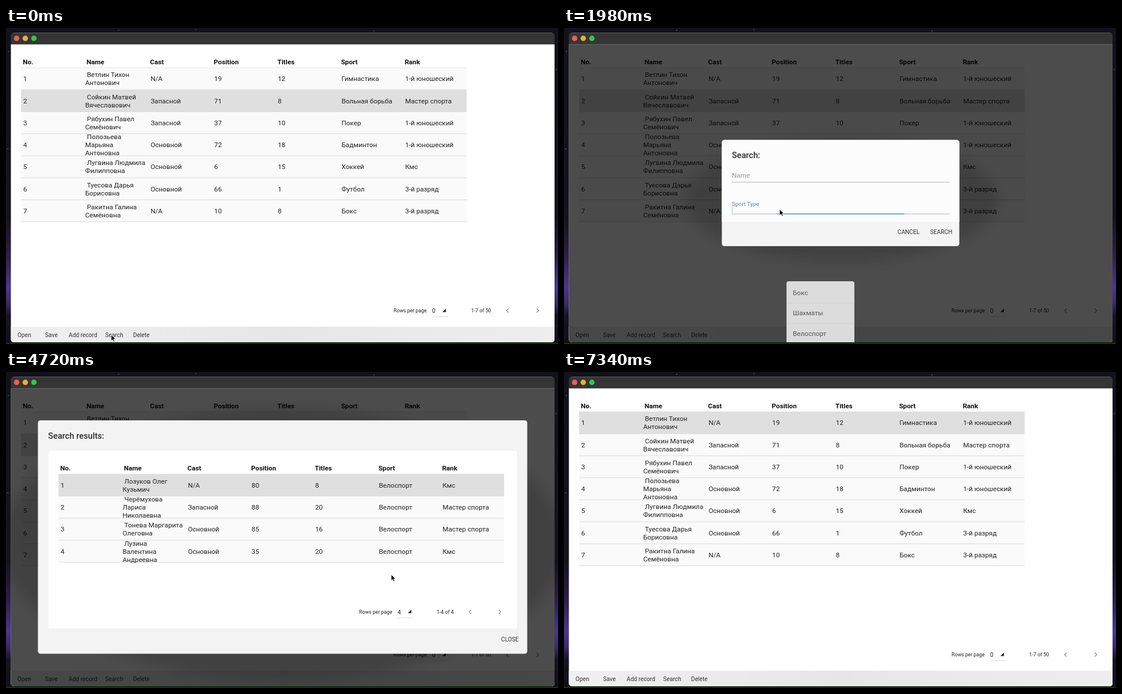
Recreate the animation shown at these times as an HTML page. Size 960x549 px, loop 7460 ms.

```html
<!DOCTYPE html>
<html lang="ru">
<head>
<meta charset="utf-8">
<title>Table search</title>
<style>
html, body { margin: 0; width: 100%; height: 100%; overflow: hidden; background: #12121c; }
svg { display: block; width: 100vw; height: 100vh; font-family: Roboto, sans-serif; }
</style>
</head>
<body>
<svg id="stage" viewBox="0 0 960 549" xmlns="http://www.w3.org/2000/svg"></svg>
<script>
const LOOP = 7460, BODY = 11.7, BUTTON = 10.2, CAPTION = 8.76, TITLE = 14.6;
const ROW = 38.25, COL = 110.7;

const records = [
  'Ветлин Тихон/Антонович|N/A|19|12|Гимнастика|1-й юношеский',
  'Сойкин Матвей/Вячеславович|Запасной|71|8|Вольная борьба|Мастер спорта',
  'Рябухин Павел/Семёнович|Запасной|37|10|Покер|1-й юношеский',
  'Полозьева/Марьяна/Антоновна|Основной|72|18|Бадминтон|1-й юношеский',
  'Лугвина Людмила/Филипповна|Основной|6|15|Хоккей|Кмс',
  'Туесова Дарья/Борисовна|Основной|66|1|Футбол|3-й разряд',
  'Ракитна Галина/Семёновна|N/A|10|8|Бокс|3-й разряд'
];
const found = [
  'Лозуков Олег/Кузьмич|N/A|80|8|Велоспорт|Кмс',
  'Черёмухова/Лариса/Николаевна|Запасной|88|20|Велоспорт|Мастер спорта',
  'Тонева Маргарита/Олеговна|Основной|85|16|Велоспорт|Мастер спорта',
  'Лузина/Валентина/Андреевна|Основной|35|20|Велоспорт|Кмс'
];

// Markup helpers; text is placed by its vertical centre
const text = (x, y, s, size = BODY, fill = '#222', extra = '') =>
  `<text x="${x}" y="${y + size * 0.355}" font-size="${size}" fill="${fill}" ${extra}>${s}</text>`;
const rect = (x, y, w, h, fill, extra = '') =>
  `<rect x="${x}" y="${y}" width="${w}" height="${h}" fill="${fill}" ${extra}/>`;
const line = (x1, x2, y, color, extra = '') =>
  `<line x1="${x1}" x2="${x2}" y1="${y}" y2="${y}" stroke="${color}" ${extra}/>`;
const group = (id, body, extra = '') => `<g id="${id}" ${extra}>${body}</g>`;

function table(id, rows, x, y) {
  const heads = ['No.', 'Name', 'Cast', 'Position', 'Titles', 'Sport', 'Rank'];
  let out = heads.map((h, i) => text(x + 3 + i * COL, y - 10.5, h, BODY, '#111', 'font-weight="700"')).join('');
  out += rect(x, y, 775, ROW * rows.length, '#fafafa') + line(x, x + 775, y, '#e4e4e4');
  out += rect(x, y, 775, ROW, '#dfdfdf', `id="${id}Mark"`);
  rows.forEach((row, i) => {
    const mid = y + ROW * (i + 0.5) + 0.1;
    const [name, ...cells] = row.split('|'), parts = name.split('/');
    out += line(x, x + 775, y + ROW * (i + 1), '#dcdcdc');
    out += text(x + 3.8, mid, i + 1);
    parts.forEach((p, k) => {
      out += text(x + (k ? 111.5 : 114.6), mid + (k - (parts.length - 1) / 2) * 14, p);
    });
    cells.forEach((c, k) => out += text(x + 3.8 + (k + 2) * COL, mid, c));
  });
  return out;
}

function pager(x, y, count, range, prev, next, underline = true) {
  const chevron = (cx, d) =>
    `<path d="M${cx - d * 2} ${y - 3.5}l${d * 3.5} 3.5l${-d * 3.5} 3.5" fill="none" stroke="#888" stroke-width="1.2"/>`;
  return text(x, y, 'Rows per page', CAPTION) + text(x + 67, y + 0.5, count, BUTTON) +
    `<path d="M${x + 85} ${y + 2.5}h6v-6z" fill="#222"/>` +
    (underline ? line(x + 67, x + 95, y + 10.5, '#ddd') : '') +
    text(x + 135, y, range, CAPTION) + chevron(prev, -1) + chevron(next, 1);
}

const shadow = (id, x, y, w, h) =>
  `<ellipse id="${id}" cx="${x + w / 2}" cy="${y + h / 2 + 12}" rx="${w / 2 + 65}" ry="${h * 0.58}" opacity=".14" filter="url(#soft)"/>`;

const lights = ['#fc5b57', '#e5b03a', '#34c648']
  .map((c, i) => `<circle cx="${18.5 + i * 15}" cy="18" r="4.7" fill="${c}"/>`).join('');
const tools = [[20, 'Open'], [68, 'Save'], [109, 'Add record'], [172.5, 'Search'], [221, 'Delete']]
  .map(([x, s]) => text(x, 533, s, BUTTON, '#333')).join('');
const stars = [[4, 41], [196, 4], [330, 3], [957, 72], [3, 210], [640, 5]]
  .map(([x, y]) => `<circle cx="${x}" cy="${y}" r=".7" fill="#9a94b8"/>`).join('');

const searchMenu =
  rect(180, 371, 205, 150, '#f1f1f1', 'rx="16" filter="url(#edge)"') +
  rect(188, 376, 190, 157, '#f4f4f4', 'rx="4"') + line(190, 376, 533, '#dedede') +
  ['По имени и виду спорта', 'По кол-ву титулов', 'По имени и разряду']
    .map((s, i) => text(200, 405.3 + i * 35.3, s, BODY, '#333')).join('');

const sportMenu = rect(387, 440, 118, 120, '#fafafa', 'rx="4"') +
  ['Бокс', 'Шахматы', 'Велоспорт'].map((s, i) =>
    text(398, 460 + i * 35.3, s, BODY, '#555') +
    (i ? line(387, 505, 442.5 + i * 35.3, '#ececec') : '')).join('');

const searchDialog = shadow('searchShade', 274.5, 194.5, 413, 185) +
  rect(274.5, 194.5, 413, 184.5, '#f4f4f4', 'rx="4.5"') +
  '<path d="M274.5 337V199a4.5 4.5 0 0 1 4.5-4.5H683a4.5 4.5 0 0 1 4.5 4.5V337z" fill="#fcfcfc"/>' +
  text(292, 221, 'Search:', TITLE, '#2c2c2c', 'font-weight="500"') +
  group('nameHint', text(292, 257.7, 'Name', BODY, '#999')) +
  line(292, 670.5, 267.8, '#c2c2c2', 'class="rule"') +
  line(292, 670.5, 323.1, '#c2c2c2', 'class="rule"') +
  line(481, 481, 323.1, '#5a9bd0', 'id="focusRule" stroke-width="1.5"') +
  `<text id="sportHint" x="292">Sport Type</text>` +
  rect(292, 309, 0.8, 13, '#8fb9dd', 'id="caret"') +
  group('value', text(292, 316, 'Велоспорт', BODY, '#222')) +
  text(580, 354, 'CANCEL', BUTTON, '#333') + text(636.7, 354, 'SEARCH', BUTTON, '#333');

const results = shadow('resultShade', 55.5, 84, 851, 405) +
  rect(55.5, 84, 851, 405.5, '#f3f3f3', 'id="frame" rx="4.5"') +
  group('inner',
    text(73.3, 111, 'Search results:', TITLE, '#2c2c2c', 'font-weight="500"') +
    rect(73.5, 137, 815.5, 308.5, '#fff', 'rx="4"') +
    table('found', found, 91.2, 177.4) +
    text(861, 464.5, 'CLOSE', BUTTON, '#333')) +
  group('pagerEarly', pager(636, 268, 4, '1-4 of 4', 823, 865, false)) +
  group('pagerFinal', pager(614, 416.5, 4, '1-4 of 4', 807, 859));

const stage = document.getElementById('stage');
stage.innerHTML = `
<defs>
  <linearGradient id="sky" x2="0" y2="1">
    <stop offset="0" stop-color="#11121b"/><stop offset=".6" stop-color="#16131f"/>
    <stop offset=".72" stop-color="#2a1f4a"/><stop offset=".82" stop-color="#4c368c"/>
    <stop offset=".87" stop-color="#3a2a70"/><stop offset=".91" stop-color="#171326"/>
    <stop offset="1" stop-color="#0f1018"/>
  </linearGradient>
  <linearGradient id="bar" x2="1" y2="0">
    <stop offset="0" stop-color="#f0f0f0"/><stop offset=".5" stop-color="#e6e6e6"/><stop offset="1" stop-color="#eeeeee"/>
  </linearGradient>
  <filter id="soft" x="-20%" y="-40%" width="140%" height="180%"><feGaussianBlur stdDeviation="10"/></filter>
  <filter id="edge"><feGaussianBlur stdDeviation="1.5"/></filter>
  <clipPath id="view"><path d="M8.5 28.5H954V541a5 5 0 0 1-5 5H13.5a5 5 0 0 1-5-5z"/></clipPath>
</defs>
${rect(0, 0, 960, 549, 'url(#sky)')}${stars}
${rect(0, 547, 960, 2, '#0b3d12')}
<path d="M8.5 30V13a5 5 0 0 1 5-5H949a5 5 0 0 1 5 5V30z" fill="#353535"/>
${line(13, 949, 8.5, '#5c5c5c')}${lights}
<g clip-path="url(#view)">
  ${rect(8, 28, 946, 518, '#fff')}
  ${table('main', records, 26.2, 69)}
  ${pager(674, 491, 0, '1-7 of 50', 872, 925)}
  ${rect(8, 519, 946, 27, 'url(#bar)')}${tools}
  ${group('searchMenu', searchMenu)}
  ${rect(8, 28, 946, 518, '#000', 'id="dim"')}
  ${group('searchDialog', searchDialog)}
  ${group('sportMenu', sportMenu)}
  ${group('results', results)}
</g>
<circle id="click" r="16" fill="none" stroke="#333" stroke-width="1.3"/>
<path id="cursor" d="M0 0V10.5L2.5 8.3L4.1 12L5.9 11.2L4.3 7.6H7.5Z" fill="#000" stroke="#fff" stroke-width=".8"/>`;

const el = {};
stage.querySelectorAll('[id]').forEach(n => el[n.id] = n);
const rules = stage.querySelectorAll('.rule');

const path = [
  [0, 183, 533], [440, 183, 533], [740, 286, 398], [900, 286, 398], [1100, 285, 402],
  [1360, 285, 402], [1700, 375, 315], [2220, 375, 315], [2500, 428, 526], [2760, 428, 526],
  [2960, 470, 423], [3420, 670, 352], [4720, 670, 352], [4820, 655, 362], [5700, 655, 362],
  [5800, 839, 478], [6060, 840, 477], [6300, 840, 477], [6440, 868, 462], [6640, 868, 462],
  [6980, 790, 439], [7280, 790, 439], [7340, 700, 80]
];
const clicks = [[20, 240], [840, 960], [1720, 1880], [2520, 2660], [3560, 4400], [6460, 6600]];

const ramp = (t, a, b) => Math.min(1, Math.max(0, (t - a) / (b - a)));
const mix = (a, b, p) => a + (b - a) * p;
const smooth = p => p * p * (3 - 2 * p);
const outQuad = p => p * (2 - p);
const set = (node, attrs) => { for (const k in attrs) node.setAttribute(k, attrs[k]); };
const show = (node, opacity) => set(node, { opacity, visibility: opacity > 0 ? 'visible' : 'hidden' });

function cursorAt(t) {
  const i = path.findIndex(p => p[0] > t);
  if (i < 0) return path[path.length - 1].slice(1);
  const [a, b] = [path[i - 1], path[i]];
  const p = smooth(ramp(t, a[0], b[0]));
  return [mix(a[1], b[1], p), mix(a[2], b[2], p)];
}

function render(t) {
  const grow = outQuad(ramp(t, 220, 440));
  show(el.searchMenu, grow * (1 - ramp(t, 820, 960)));
  set(el.searchMenu, { transform: `translate(188 533) scale(${Math.max(grow, 0.01)}) translate(-188 -533)` });

  const closing = ramp(t, 6560, 6760);
  show(el.dim, 0.7 * ramp(t, 978, 1178) * (1 - closing));
  show(el.searchDialog, ramp(t, 950, 1100) * (1 - ramp(t, 4400, 4460)));

  // Form fields
  const settle = ramp(t, 1180, 1220), focus = ramp(t, 1864, 2064), active = t > 1864 && t < 2980;
  set(el.nameHint, { transform: `translate(0 ${-1.5 * settle})` });
  rules.forEach(r => set(r, { 'stroke-width': mix(1.8, 1.2, settle) }));
  const size = mix(BODY, CAPTION, focus);
  set(el.sportHint, {
    'font-size': size, y: mix(313, 299.5, focus) + size * 0.355, fill: active ? '#5288b8' : '#999'
  });
  set(el.focusRule, { x1: 481 - 189 * focus, x2: 481 + 189.5 * focus, opacity: active ? 1 : 0 });
  set(el.caret, { opacity: active && t < 2640 ? 1 : 0 });
  set(el.value, { opacity: t >= 2640 ? 1 : 0 });
  show(el.sportMenu, 0.83 * ramp(t, 1880, 1980) + 0.17 * ramp(t, 1980, 2080) - ramp(t, 2560, 2780));

  // The results first pop up collapsed, then snap into place
  const open = ramp(t, 4400, 4460), top = mix(238.5, 84, open), height = mix(96.5, 405.5, open);
  show(el.results, t >= 4020 ? 1 - closing : 0);
  set(el.frame, { y: top, height });
  set(el.resultShade, { cy: top + height / 2 + mix(4, 12, open), ry: height * 0.58 });
  set(el.inner, { transform: `translate(0 ${mix(-154.5, 0, open)})` });
  set(el.pagerEarly, { opacity: open < 1 ? 1 : 0 });
  set(el.pagerFinal, { opacity: open < 1 ? 0 : 1 });
  set(el.foundMark, { opacity: open < 1 ? 0 : 1 });

  set(el.mainMark, { y: 69 + (t < 7280 ? ROW : 0) });

  const [x, y] = cursorAt(t);
  set(el.cursor, { transform: `translate(${x} ${y})`, opacity: t < 7340 ? 1 : 0 });
  const press = clicks.find(([a, b]) => t >= a && t < b);
  show(el.click, press ? Math.min(1, ramp(t, press[0], press[0] + 60), 1 - ramp(t, press[1] - 60, press[1])) : 0);
  set(el.click, { cx: x, cy: y + 2 });
}

const start = performance.now();
function tick() {
  render((performance.now() - start) % LOOP);
  requestAnimationFrame(tick);
}
tick();
</script>
</body>
</html>
```
